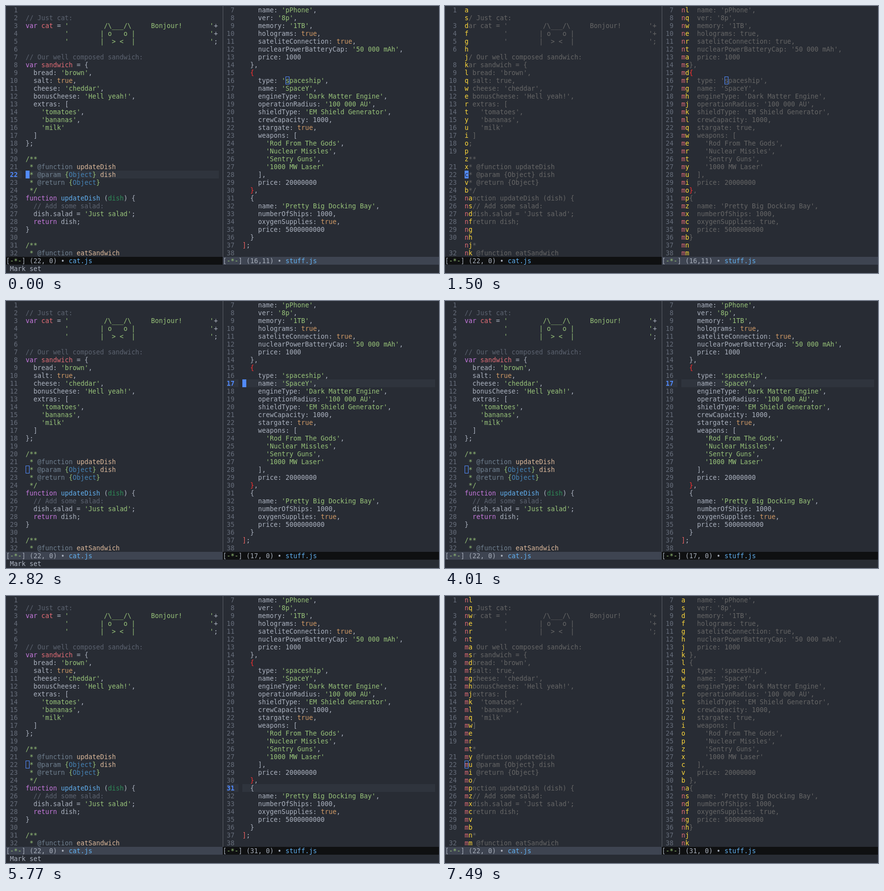
Animation of 883x545 px, one loop 8 s. Source, as an HTML page with a canvas:

```html
<!DOCTYPE html>
<html lang="en">
<head>
<meta charset="utf-8">
<title>Jumping between editor windows</title>
<style>
  html, body { margin: 0; width: 100%; height: 100%; overflow: hidden; background: #282c34; }
  canvas { display: block; }
</style>
</head>
<body>
<canvas id="stage" width="883" height="545"></canvas>
<script>
const LOOP = 8000, CELL = 8, ROW = 16, BASELINE = 13, ROWS = 32;
const FONT = '13.288px "DejaVu Sans Mono", monospace';

const C = {
  bg: '#282c34', line: '#2f343d', text: '#abb2bf', number: '#666d7a', border: '#5c6068',
  cursor: '#528bff', dim: '#666666', lead: '#ffd93b', prefix: '#e06c75',
  active: '#0f1011', inactive: '#3e4451', status: '#a6adb9',
  comment: '#5c6370', string: '#98c379', keyword: '#c678dd', variable: '#e06c75',
  constant: '#d19a66', func: '#61afef', param: '#2e8b57',
  tag: '#708090', type: '#4682b4', value: '#dcb99b',
  paren: '#ff3030', outerParen: '#ee6363'
};

const catSource = String.raw`
// Just cat:
var cat = '         /\___/\     Bonjour!       '+
          '        | o   o |                   '+
          '        |  > <  |                   ';

// Our well composed sandwich:
var sandwich = {
  bread: 'brown',
  salt: true,
  cheese: 'cheddar',
  bonusCheese: 'Hell yeah!',
  extras: [
    'tomatoes',
    'bananas',
    'milk'
  ]
};

/**
 * @function updateDish
 * @param {Object} dish
 * @return {Object}
 */
function updateDish (dish) {
  // Add some salad:
  dish.salad = 'Just salad';
  return dish;
}

/**
 * @function eatSandwich`;

const stuffSource = `    name: 'pPhone',
    ver: '8p',
    memory: '1TB',
    holograms: true,
    sateliteConnection: true,
    nuclearPowerBatteryCap: '50 000 mAh',
    price: 1000
  },
  {
    type: 'spaceship',
    name: 'SpaceY',
    engineType: 'Dark Matter Engine',
    operationRadius: '100 000 AU',
    shieldType: 'EM Shield Generator',
    crewCapacity: 1000,
    stargate: true,
    weapons: [
      'Rod From The Gods',
      'Nuclear Missles',
      'Sentry Guns',
      '1000 MW Laser'
    ],
    price: 20000000
  },
  {
    name: 'Pretty Big Docking Bay',
    numberOfShips: 1000,
    oxygenSupplies: true,
    price: 5000000000
  }
];
`;

const panes = [
  { x: 0, width: 442, first: 1, file: 'cat.js', lines: catSource.split('\n') },
  { x: 442, width: 441, first: 7, file: 'stuff.js', lines: stuffSource.split('\n') }
];

// Line numbers that a jump label pushes out of view
const hiddenNumbers = [2, 7, 20, 31];

const KEYS = [...'asdfghjklqwertyuiopzxcvbnm'];
const LABELS = [
  ...KEYS.slice(0, 24),
  ...KEYS.slice(0, 14).map(k => 'n' + k),
  ...KEYS.map(k => 'm' + k)
];

// Times at which a two-valued part flips; both start switched on
const blinkFlips = [480, 1020, 1980, 2520, 2970, 3500, 4010, 4190, 4730, 5200, 5680, 6190, 6600, 7020, 7490];
const messageFlips = [1020, 2820, 3800, 5770, 6720];

// Typed label prefix; null when no jump is in progress
const jumpSteps = [[0, null], [1500, ''], [2580, 'm'], [2820, null], [4190, ''], [5380, 'n'], [5770, null], [7020, '']];
// Focused pane and the cursor of the right pane
const focusSteps = [
  [0, { pane: 0, line: 16, col: 11 }],
  [2820, { pane: 1, line: 17, col: 0 }],
  [5770, { pane: 1, line: 31, col: 0 }]
];
const innerParens = [{ line: 15, col: 2, color: C.paren }, { line: 30, col: 2, color: C.paren }, { line: 37, col: 0, color: C.outerParen }];
const parenSteps = [[0, innerParens], [5890, [{ line: 37, col: 0, color: C.paren }]]];

const passed = (times, t) => times.filter(at => at <= t).length;
const isOn = (flips, t) => passed(flips, t) % 2 === 0;
const stepAt = (steps, t) => steps[passed(steps.map(s => s[0]), t) - 1][1];

const codeRules = [
  [/\/\/.*/, C.comment], [/'[^']*'/, C.string], [/\b(?:var|function|return)\b/, C.keyword],
  [/\btrue\b/, C.constant], [/(?<=var )\w+/, C.variable], [/(?<=function )\w+/, C.func],
  [/(?<=\()\w+(?=\))/, C.param]
];
const docRules = [[/@\w+/, C.tag], [/(?<=\{)\w+/, C.type], [/\w+/, C.value]];

function tokenize(text) {
  const isDoc = /^(\/\*| \*)/.test(text);
  const rules = isDoc ? docRules : codeRules;
  const base = isDoc ? C.string : C.text;
  const pattern = new RegExp(rules.map(r => `(${r[0].source})`).join('|'), 'g');
  const tokens = [];
  let end = 0;
  for (const m of text.matchAll(pattern)) {
    tokens.push([end, text.slice(end, m.index), base]);
    tokens.push([m.index, m[0], rules[m.slice(1).findIndex(g => g !== undefined)][1]]);
    end = m.index + m[0].length;
  }
  tokens.push([end, text.slice(end), base]);
  return tokens;
}

const ctx = document.getElementById('stage').getContext('2d');

function rect(x, y, w, h, color) {
  ctx.fillStyle = color;
  ctx.fillRect(x, y, w, h);
}

function print(text, x, y, color, bold) {
  if (!text.trim()) return;
  // Skip leading blanks so each run starts on its own cell
  const indent = text.length - text.trimStart().length;
  ctx.font = (bold ? 'bold ' : '') + FONT;
  ctx.fillStyle = color;
  ctx.fillText(text.trim(), x + indent * CELL, y + BASELINE);
}

function labelFor(index, row, state) {
  if (state.jump === null) return '';
  const label = LABELS[(index === state.focus.pane ? 0 : ROWS) + row];
  return label.startsWith(state.jump) ? label.slice(state.jump.length) : '';
}

function drawCursor(x, y, char, focused, visible) {
  if (!focused) {
    ctx.strokeStyle = C.cursor;
    ctx.lineWidth = 1;
    ctx.strokeRect(x + .5, y + .5, CELL - 1, ROW - 1);
  } else if (visible) {
    rect(x, y, CELL, ROW, C.cursor);
    print(char, x, y, C.bg);
  }
}

function drawLine(pane, index, row, state, cursor) {
  const number = pane.first + row, y = row * ROW, left = pane.x + 5 * CELL;
  const focused = index === state.focus.pane, dimmed = state.jump !== null;
  const current = focused && !dimmed && number === cursor.line;
  const label = labelFor(index, row, state);

  if (current) {
    rect(pane.x + CELL, y, 3 * CELL, ROW, C.line);
    rect(left, y, pane.width - 6 * CELL, ROW, C.line);
  }
  if (!(index === 0 && label && hiddenNumbers.includes(number))) {
    print(String(number).padStart(2), pane.x + CELL, y, current ? C.cursor : C.number, current);
  }

  let text = ' '.repeat(label.length) + pane.lines[row].slice(label.length);
  const paren = index === 1 && state.parens.find(p => p.line === number && p.col >= label.length);
  if (paren) {
    print(text[paren.col], left + paren.col * CELL, y, paren.color);
    text = text.slice(0, paren.col) + ' ' + text.slice(paren.col + 1);
  }
  const tokens = dimmed ? [[0, text, C.dim]] : tokenize(text);
  for (const [col, part, color] of tokens) print(part, left + col * CELL, y, color);

  [...label].forEach((char, i) => {
    print(char, left + i * CELL, y, i === label.length - 1 ? C.lead : C.prefix);
  });

  if (number === cursor.line) {
    const char = label[cursor.col] || text[cursor.col] || ' ';
    drawCursor(left + cursor.col * CELL, y, char, focused, state.cursorOn);
  }
}

function drawStatus(pane, focused, cursor) {
  const y = ROWS * ROW;
  const at = (col, text, color) => print(text, pane.x + col * CELL, y, color);
  rect(pane.x, y, pane.width, ROW, focused ? C.active : C.inactive);
  at(0, '[', C.status);
  at(1, '-*-', C.string);
  at(4, `] (${cursor.line},${String(cursor.col).padStart(2)}) •`, C.status);
  at(16, pane.file, C.func);
}

function draw(t) {
  const state = {
    cursorOn: isOn(blinkFlips, t),
    jump: stepAt(jumpSteps, t),
    focus: stepAt(focusSteps, t),
    parens: stepAt(parenSteps, t)
  };
  rect(0, 0, 883, 545, C.bg);
  panes.forEach((pane, index) => {
    const cursor = index ? state.focus : { line: 22, col: 0 };
    for (let row = 0; row < ROWS; row++) drawLine(pane, index, row, state, cursor);
    drawStatus(pane, index === state.focus.pane, cursor);
  });
  rect(442, 0, 1, ROWS * ROW, C.border);
  if (isOn(messageFlips, t)) print('Mark set', CELL, 33 * ROW, C.text);
}

const start = performance.now();
function tick(now) {
  draw(Math.max(0, now - start) % LOOP);
  requestAnimationFrame(tick);
}
draw(0);
requestAnimationFrame(tick);
</script>
</body>
</html>
```
